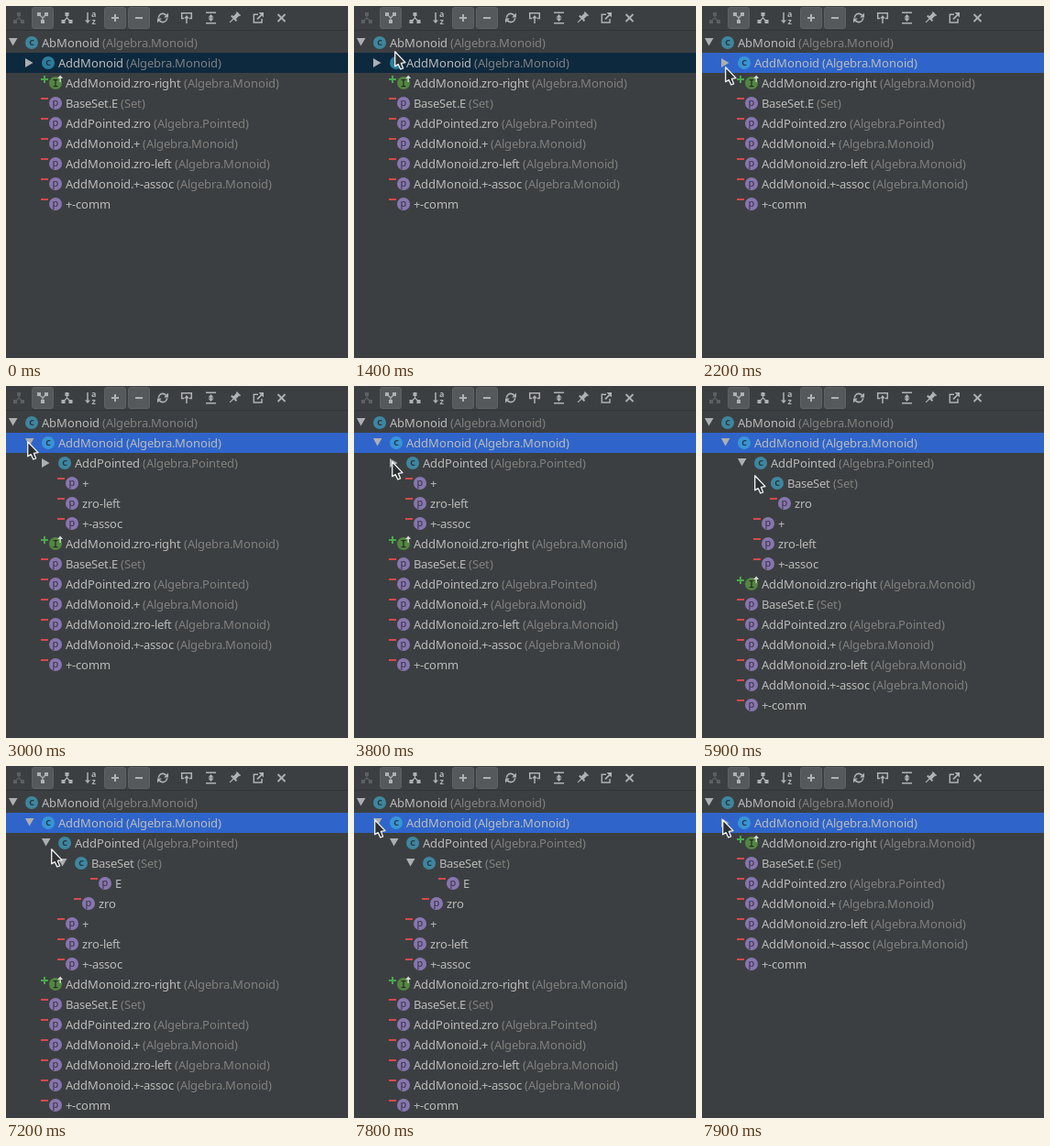
An HTML page with a canvas for the animation above (8000 ms loop, 373 px wide and 384 px high).

```html
<!DOCTYPE html>
<html lang="en">
<head>
<meta charset="utf-8">
<title>Class hierarchy tree</title>
<style>
html, body { margin: 0; width: 373px; height: 384px; overflow: hidden; background: #3c3f41; }
canvas { display: block; }
</style>
</head>
<body>
<canvas id="stage" width="373" height="384"></canvas>
<script>
const ctx = document.getElementById('stage').getContext('2d');
const LOOP = 8000, STEP = 100, ROW = 22;
const FONT = '"Noto Sans", "Open Sans", sans-serif';
const ICON = '#afb1b3', TEXT = '#bbbbbb', DIM = '#808080';

function rect(x, y, w, h, color) {
  ctx.fillStyle = color;
  ctx.fillRect(x, y, w, h);
}

function shape(points, color) {
  ctx.beginPath();
  points.forEach(([x, y]) => ctx.lineTo(x, y));
  ctx.closePath();
  ctx.fillStyle = color;
  ctx.fill();
}

function line(points, color = ICON, width = 1.5) {
  ctx.beginPath();
  points.forEach(([x, y], i) => i ? ctx.lineTo(x, y) : ctx.moveTo(x, y));
  ctx.strokeStyle = color;
  ctx.lineWidth = width;
  ctx.stroke();
}

function label(str, x, y, color, font) {
  ctx.font = font + FONT;
  ctx.fillStyle = color;
  ctx.fillText(str, x, y);
}

// Glyphs advance by whole pixels; returns the x after the last one.
function gridText(str, x, y, color) {
  for (const ch of str) {
    label(ch, x, y, color, '13px ');
    x += Math.round(ctx.measureText(ch).width);
  }
  return x;
}

// ---- toolbar ----

function pressed(x) {
  ctx.beginPath();
  ctx.roundRect(x + 0.5, 1.5, 23, 23, 2.5);
  ctx.fillStyle = '#55595c';
  ctx.fill();
  ctx.strokeStyle = '#5e6265';
  ctx.lineWidth = 1;
  ctx.stroke();
}

function fork(x, color, dir) {
  const y = 13;
  line([[x, y - 4 * dir], [x, y], [x - 4, y + 4 * dir]], color, 1.2);
  line([[x, y], [x + 4, y + 4 * dir]], color, 1.2);
  rect(x - 2, y - 4 * dir - 2, 4, 4, color);
  rect(x - 6, y + 4 * dir - 2, 4, 4, color);
  rect(x + 2, y + 4 * dir - 2, 4, 4, color);
}

function arrow(x, from, to, w = 3) {
  const d = Math.sign(to - from);
  line([[x, from], [x, to - 2 * d]]);
  shape([[x - w, to - 3.5 * d], [x + w, to - 3.5 * d], [x, to]], ICON);
}

function toolbar() {
  rect(0, 26, 373, 1, '#323537');
  [28, 107, 133].forEach(pressed);
  fork(14, '#5d6062', 1);
  fork(40, ICON, -1);
  fork(66.5, ICON, 1);

  arrow(89, 7, 19);
  label('a', 93, 12, ICON, 'bold 9px ');
  label('z', 93.5, 19.5, ICON, 'bold 9px ');

  rect(115, 12, 8, 2, ICON);
  rect(118, 9, 2, 8, ICON);
  rect(141, 12, 8, 2, ICON);

  for (const a of [0, Math.PI]) {
    ctx.save();
    ctx.translate(171, 13);
    ctx.rotate(a);
    ctx.beginPath();
    ctx.arc(0, 0, 4.6, Math.PI * 1.02, Math.PI * 1.82);
    ctx.strokeStyle = ICON;
    ctx.lineWidth = 1.7;
    ctx.stroke();
    shape([[6, -5.5], [6, -0.5], [1.2, -0.5]], ICON);
    ctx.restore();
  }

  line([[194, 13.5], [191.7, 13.5], [191.7, 7.7], [202.3, 7.7], [202.3, 13.5], [200, 13.5]]);
  arrow(197, 19, 10);

  rect(218, 6.5, 11, 1.5, ICON);
  rect(218, 18, 11, 1.5, ICON);
  arrow(223.5, 13, 9);
  arrow(223.5, 13, 17);

  ctx.save();
  ctx.translate(249, 13);
  ctx.rotate(Math.PI / 4);
  rect(-3, -7, 6, 1.5, ICON);
  rect(-2, -6, 4, 6, ICON);
  rect(-4, -0.5, 8, 2, ICON);
  rect(-0.6, 1, 1.2, 6, ICON);
  ctx.restore();

  line([[275, 9.2], [270.3, 9.2], [270.3, 18], [279, 18], [279, 14]]);
  line([[274, 14.3], [279.5, 8.8]], ICON, 1.7);
  shape([[275.5, 7], [281, 7], [281, 12.5]], ICON);

  line([[296.5, 9], [304.5, 17]], ICON, 1.8);
  line([[304.5, 9], [296.5, 17]], ICON, 1.8);
}

// ---- tree ----

const node = (depth, name, from, open) => ({ kind: 'c', depth, name, from, open });
const leaf = (depth, name, from) => ({ kind: 'p', depth, name, from });
const MONOID = 'Algebra.Monoid', POINTED = 'Algebra.Pointed';

function treeRows(level) {
  const rows = [node(0, 'AbMonoid', MONOID, true), node(1, 'AddMonoid', MONOID, level > 0)];
  if (level > 0) rows.push(node(2, 'AddPointed', POINTED, level > 1));
  if (level > 1) rows.push(node(3, 'BaseSet', 'Set', level > 2));
  if (level > 2) rows.push(leaf(4, 'E'));
  if (level > 1) rows.push(leaf(3, 'zro'));
  if (level > 0) rows.push(leaf(2, '+'), leaf(2, 'zro-left'), leaf(2, '+-assoc'));
  rows.push(
    { ...leaf(1, 'AddMonoid.zro-right', MONOID), kind: 'i' },
    leaf(1, 'BaseSet.E', 'Set'),
    leaf(1, 'AddPointed.zro', POINTED),
    leaf(1, 'AddMonoid.+', MONOID),
    leaf(1, 'AddMonoid.zro-left', MONOID),
    leaf(1, 'AddMonoid.+-assoc', MONOID),
    leaf(1, '+-comm'));
  return rows;
}

const DISC = { c: '#40b6e0', p: '#b99bf8', i: '#62b543' };

function badge(kind, x, y) {
  ctx.globalAlpha = 0.6;
  ctx.beginPath();
  ctx.arc(x, y, 7, 0, Math.PI * 2);
  ctx.fillStyle = DISC[kind];
  ctx.fill();
  ctx.globalAlpha = 1;
  const ink = 'rgba(35,31,32,0.8)';
  if (kind === 'i') {
    rect(x - 2.5, y - 4, 5, 1.2, ink);
    rect(x - 0.7, y - 4, 1.4, 8, ink);
    rect(x - 2.5, y + 3, 5, 1.2, ink);
    rect(x - 16, y - 5, 8, 2, '#49a84e');
    rect(x - 13, y - 8, 2, 8, '#49a84e');
    rect(x + 4.5, y - 6, 1.3, 5, '#d8dadb');
    shape([[x + 2.2, y - 5], [x + 8.1, y - 5], [x + 5.15, y - 8.5]], '#d8dadb');
    return;
  }
  ctx.textAlign = 'center';
  if (kind === 'c') label('C', x, y + 3.3, ink, '600 9px ');
  else {
    label('p', x, y + 2.8, ink, '500 11px ');
    rect(x - 16, y - 6, 8, 2, '#d9484c');
  }
  ctx.textAlign = 'left';
}

function drawRow(row, y, selected) {
  const isNode = row.kind === 'c';
  const x = 28 + row.depth * 18 + (isNode ? 0 : 8);
  if (isNode) {
    const tx = 7.5 + row.depth * 18;
    shape(row.open
      ? [[tx - 4.5, y - 5], [tx + 5, y - 5], [tx, y + 3.5]]
      : [[tx - 4.5, y - 5], [tx + 4, y], [tx - 4.5, y + 5]], '#adafb0');
  }
  badge(row.kind, x, y);
  const end = gridText(row.name, x + 11, y + 5, TEXT);
  if (row.from) gridText(' (' + row.from + ')', end, y + 5, selected ? TEXT : DIM);
}

// ---- pointer ----

// time, x, y of the pointer's upper left corner
const PATH = [
  [900, 100, 0], [1700, 25, 66], [2600, 25, 66], [2700, 23, 60], [3300, 23, 60],
  [3500, 35, 80], [3600, 35, 80], [3800, 41, 82], [5200, 41, 82], [5900, 57, 97],
  [7100, 57, 97], [7200, 49, 90], [7800, 22, 58], [LOOP, 22, 58]
];

function pointer(t) {
  if (t < PATH[0][0]) return;
  const i = PATH.findIndex(k => k[0] > t);
  const [t0, x0, y0] = PATH[i - 1], [t1, x1, y1] = PATH[i];
  const u = (t - t0) / (t1 - t0);
  const e = u * (3 - u) / 2;
  ctx.save();
  ctx.translate(Math.round(x0 + (x1 - x0) * e), Math.round(y0 + (y1 - y0) * e));
  ctx.lineJoin = 'round';
  shape([[0.7, 0.8], [0.7, 16.8], [4.2, 14.6], [6.8, 20], [9.6, 18.8], [7.4, 13.4], [12, 12.6]], '#2c3033');
  ctx.strokeStyle = '#f2f3f3';
  ctx.lineWidth = 1.3;
  ctx.stroke();
  ctx.restore();
}

// ---- playback ----

function levelAt(t) {
  if (t < 2900 || t >= 7900) return 0;
  return t < 4700 ? 1 : t < 6000 ? 2 : 3;
}

function draw(time) {
  const t = Math.floor(time % LOOP / STEP) * STEP;
  const focused = t >= 2200;
  rect(0, 0, 373, 384, '#3c3f41');
  toolbar();
  rect(0, 51, 373, ROW, focused ? '#2f65ca' : '#0d293e');
  treeRows(levelAt(t)).forEach((row, i) => drawRow(row, 40 + i * ROW, focused && i === 1));
  pointer(t);
}

let start;
function tick(now) {
  start ??= now;
  draw(now - start);
  requestAnimationFrame(tick);
}
draw(0);
requestAnimationFrame(tick);
</script>
</body>
</html>
```
